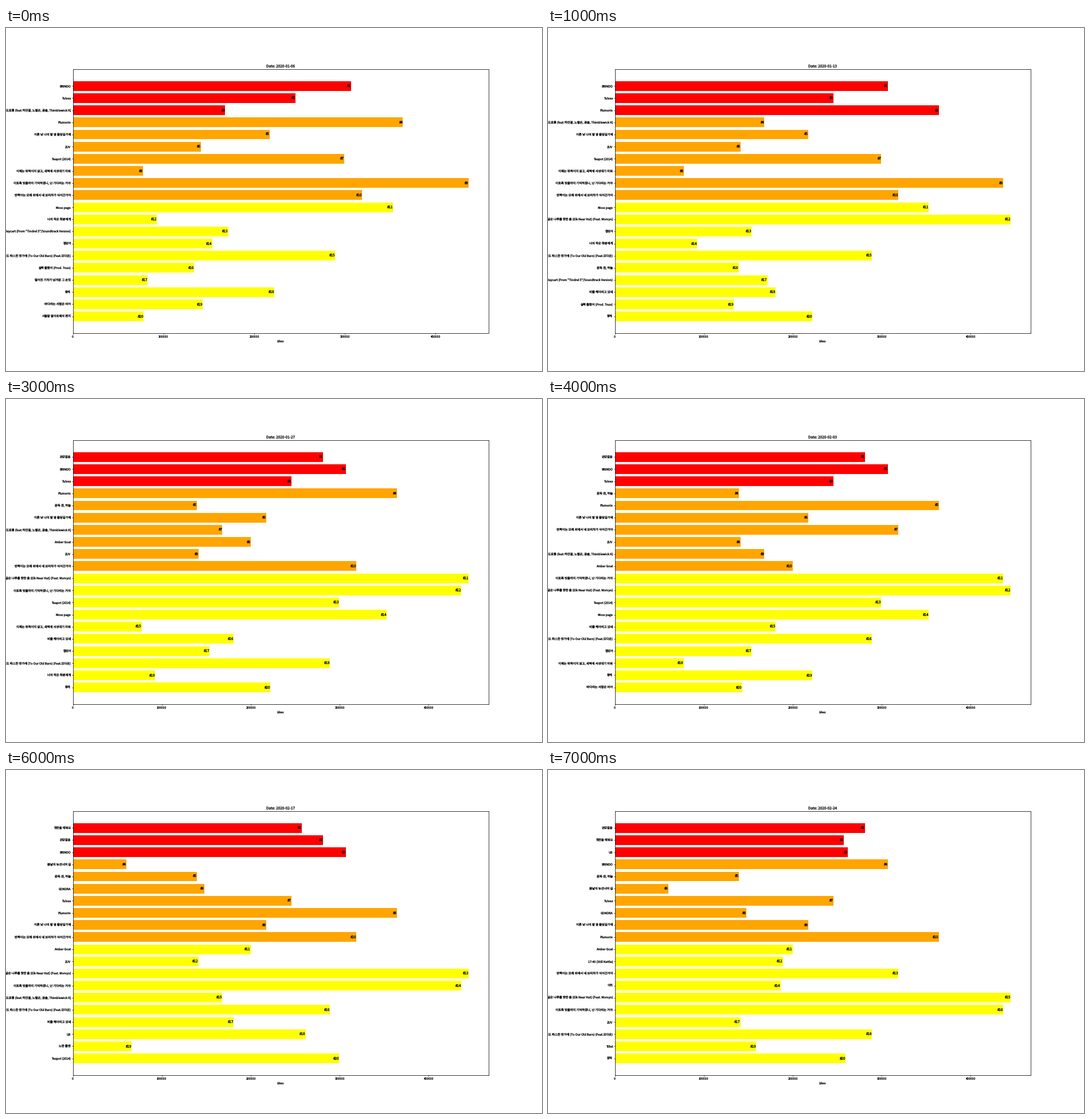
Write a matplotlib script that moves like this. It is 935 by 599 pixels and loops after 8 s.

```python
import matplotlib.pyplot as plt
from matplotlib.animation import FuncAnimation

plt.rcParams.update({
    "font.family": "Noto Sans CJK JP",
    "text.hinting": "none",
    "axes.linewidth": 0.55,
    "axes.titlesize": 4.6,
    "axes.titlepad": 2.2,
    "axes.labelsize": 3.75,
    "axes.labelpad": 1.5,
    "xtick.labelsize": 3.75,
    "ytick.labelsize": 3.8,
})
for axis in ("xtick", "ytick"):
    plt.rcParams.update({
        f"{axis}.major.size": 1.3,
        f"{axis}.major.pad": 1.4,
        f"{axis}.major.width": 0.5,
    })

# key: (title, likes in thousands)
SONGS = {
    "A": ("BRINDO", 307.0),
    "B": ("Tulvex", 245.8),
    "C": ("도로롱 (feat.하진결, 노별온, 곰솔, Thimblewick K)", 168.1),
    "D": ("Plumorin", 364.3),
    "E": ("이른 낮 나의 밭 옆 돌담길가에", 217.2),
    "F": ("ZUV", 141.2),
    "G": ("Teapot (2014)", 299.7),
    "H": ("이제는 뒤척이지 않고, 새벽에 서성대기 미워", 77.2),
    "I": ("이토록 빗물까지 기억하겠니, 난 기다리는 거야", 436.8),
    "J": ("반짝이는 모래 위에서 네 보리차가 식어간거야", 319.0),
    "K": ("Moss page", 353.2),
    "L": ("너의 작은 화분에게", 92.5),
    "M": ('Under the Haycart (From "Tindrel 5"/Soundtrack Version)', 171.5),
    "N": ("접었어", 153.6),
    "O": ("내일도 따스한 창가에 (To Our Old Barn) (Feat.모다온)", 289.3),
    "P": ("살짝 졸렸어 (Prod. 7nuv)", 133.6),
    "Q": ("멀어진 기차가 남겨둔 그 손짓", 82.3),
    "R": ("뭉게", 222.3),
    "S": ("바다라는 서랍은 비어", 143.1),
    "T": ("시월말 열아흐레의 편지", 78.0),
    "U": ("온갖걸음", 281.3),
    "V": ("문득 갠, 하늘", 139.3),
    "W": ("Amber Goat", 199.9),
    "X": ("굽은 나루를 향한 춤 (Elk Near Hut) (Feat. Morvyn)", 445.2),
    "Y": ("Fernboat", 42.5),
    "Z": ("비를 헤아리고 있네", 180.8),
    "a": ("봄날의 능선너머 길", 60.0),
    "b": ("찻잔을 데워요", 257.3),
    "c": ("GONDRA", 148.0),
    "d": ("UB", 261.9),
    "e": ("노란 뜰엔", 66.1),
    "f": ("17:40 (Still Kettle)", 188.9),
    "g": ("이끼", 186.4),
    "h": ("Tillet", 158.9),
    "i": ("둔덕", 259.5),
}

# weekly chart, best rank first
WEEKS = [
    ("2020-01-06", "ABCDEFGHIJKLMNOPQRST"),
    ("2020-01-13", "ABDCEFGHIJKXNLOVMZPR"),
    ("2020-01-20", "UABDVECFWJXYIGHNKOLZ"),
    ("2020-01-27", "UABDVECWFJXIGKHZNOLR"),
    ("2020-02-03", "UABVDEJFCWIXGKZONHRS"),
    ("2020-02-10", "UAaBVDEJFCIXWOGZKNRS"),
    ("2020-02-17", "bUAaVcBDEJWFXICOZdeG"),
    ("2020-02-24", "UbdAVaBcEDWfJgXIFOhi"),
]
COLORS = ["red"] * 3 + ["orange"] * 7 + ["yellow"] * 10

fig, ax = plt.subplots(figsize=(9.35, 5.99), dpi=100)


def draw(week):
    date, order = WEEKS[week]
    titles = [SONGS[key][0] for key in order]
    likes = [SONGS[key][1] * 1000 for key in order]
    rows = range(len(order))

    ax.clear()
    ax.barh(rows, likes, color=COLORS)
    for row, value in zip(rows, likes):
        ax.text(value, row, f"#{row + 1}", ha="right", va="center", size=4.5)
    ax.set_yticks(rows, titles)
    ax.set_xticks(range(0, 400001, 100000))
    ax.set_xlim(0, max(likes) * 1.05)
    ax.invert_yaxis()
    ax.set_title(f"Date: {date}")
    ax.set_xlabel("Likes")
    return []


anim = FuncAnimation(fig, draw, frames=len(WEEKS), init_func=lambda: draw(0),
                     interval=1000, repeat=True, repeat_delay=0)
plt.show()
```
